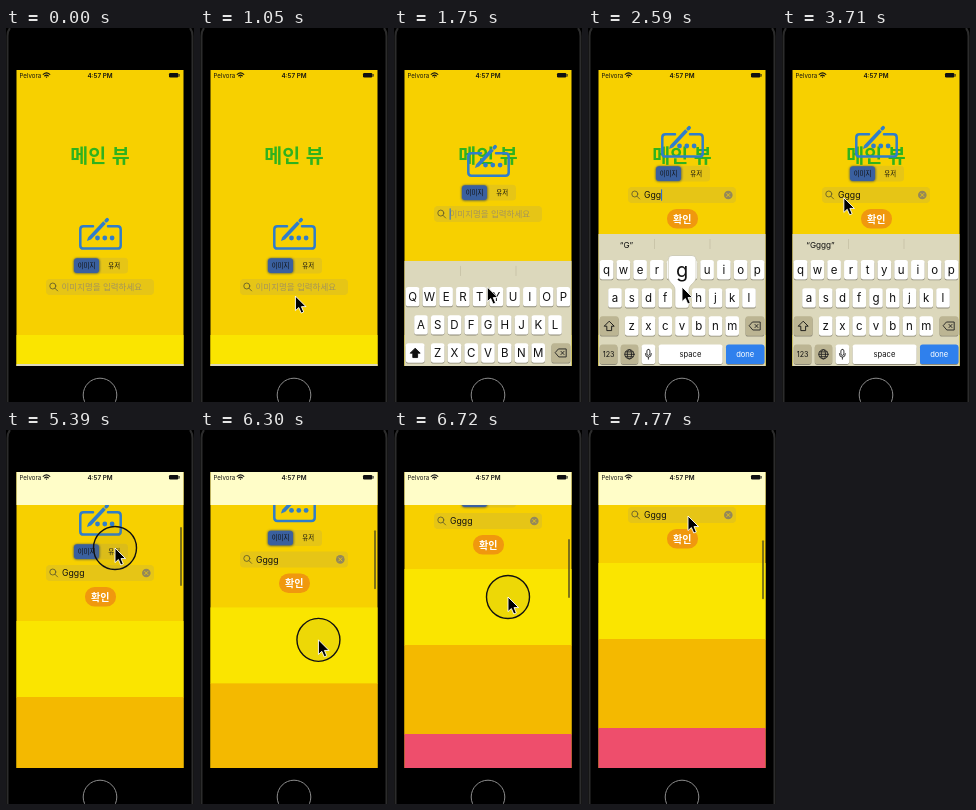
Write an HTML page that moves like this. It is 188 by 374 pixels and loops after 8 s.

```html
<!DOCTYPE html>
<html lang="ko">
<head>
<meta charset="utf-8">
<title>메인 뷰</title>
<style>
  html, body { margin: 0; width: 100%; height: 100%; overflow: hidden; background: #000; }
  svg { display: block; width: 100vw; height: 100vh; }
  text { font-family: Inter, "Noto Sans CJK KR", "Noto Sans CJK", sans-serif; text-anchor: middle; fill: #111; }
  .ko { font-family: "Noto Sans CJK KR", "Noto Sans CJK", sans-serif; }
  .left { text-anchor: start; }
  .key { fill: #fff; }
  .mod { fill: #bcb593; }
  .shade { fill: #8d8a78; }
  .line { fill: none; stroke: #222; stroke-width: .9; stroke-linecap: round; stroke-linejoin: round; }
  .icon { fill: none; stroke: #2f7dcb; stroke-width: 2.5; stroke-linecap: round; stroke-linejoin: round; }
</style>
</head>
<body>
<svg viewBox="0 0 188 374" preserveAspectRatio="none">
  <defs>
    <clipPath id="screen"><rect x="10.5" y="42" width="167" height="296"/></clipPath>
    <filter id="soft" x="-30%" y="-30%" width="160%" height="160%"><feGaussianBlur stdDeviation="1"/></filter>
  </defs>

  <rect width="188" height="374" fill="#000"/>
  <path d="M1.5 374V8Q1.5 3 4 0M186.5 374V8Q186.5 3 184 0" fill="none" stroke="#2c2c2c" stroke-width="2"/>
  <circle cx="94" cy="367" r="16.8" fill="none" stroke="#8c8c8c"/>

  <g clip-path="url(#screen)">
    <rect x="10" y="42" width="168" height="297" fill="#f7d000"/>

    <g id="page">
      <rect x="10" y="307" width="168" height="76.5" fill="#fae500"/>
      <rect x="10" y="383" width="168" height="89.5" fill="#f4b900"/>
      <rect x="10" y="472" width="168" height="120" fill="#ee4e6c"/>
      <text class="ko" x="94" y="135" font-size="19.5" font-weight="700" style="fill:#2fb21d">메인 뷰</text>

      <g id="form">
        <g class="icon">
          <path d="M87 198.2H77.5Q74.3 198.2 74.3 201.4V217.4Q74.3 220.6 77.5 220.6H111.5Q114.7 220.6 114.7 217.4V201.4Q114.7 198.2 111.5 198.2H102"/>
          <path d="M83.5 210.5L98.5 194.5" stroke-width="3.6" stroke-linecap="butt"/>
          <path d="M100.2 192.7L101.2 191.7" stroke-width="3.6"/>
        </g>
        <g fill="#2f7dcb">
          <path d="M81 213l1.2-4 2.6 2.5z"/>
          <circle cx="91.5" cy="210" r="2.4"/><circle cx="98.8" cy="210" r="2.4"/><circle cx="106.1" cy="210" r="2.4"/>
        </g>

        <rect x="67" y="229.7" width="55" height="15.8" rx="3.5" fill="#e6c516"/>
        <rect x="67.6" y="230.2" width="26" height="15.4" rx="3.5" fill="#56604a" filter="url(#soft)"/>
        <rect x="68" y="230.3" width="25" height="14.6" rx="3.2" fill="#3a609f"/>
        <text class="ko" x="80.5" y="239.9" font-size="6.4" font-weight="500">이미지</text>
        <text class="ko" x="108.2" y="239.9" font-size="6.4" font-weight="500">유저</text>

        <rect x="40" y="251" width="108" height="16" rx="4" fill="#e6c516"/>
        <circle cx="46.8" cy="258" r="3" class="line" style="stroke:#67602a"/>
        <path d="M49 260.3l2.6 2.6" class="line" style="stroke:#67602a"/>
        <text id="hint" class="ko left" x="55.5" y="262.2" font-size="8.5" style="fill:#a4955a">이미지명을 입력하세요</text>
        <text id="typed" class="left" x="56" y="262.2" font-size="8.7"></text>
        <rect id="caret" y="253.2" width="1.1" height="11.6" rx=".5" fill="#2f6fd6"/>

        <g id="filled">
          <circle cx="140.3" cy="259" r="4.3" fill="#94885a"/>
          <path d="M138.7 257.4l3.2 3.2m0-3.2l-3.2 3.2" class="line" style="stroke:#e6c516"/>
          <rect x="79" y="273" width="31" height="19.6" rx="9.6" fill="#f0980e"/>
          <text class="ko" x="94.3" y="286.5" font-size="10" font-weight="700" style="fill:#fff">확인</text>
        </g>
      </g>
    </g>

    <rect id="nav" x="10" y="42" width="168" height="33" fill="#fffdc8"/>
    <rect id="bar" x="174" y="97" width="2" height="59" rx="1" fill="#55501f" fill-opacity=".75"/>

    <text class="left" x="13.5" y="49.6" font-size="6.1">Pelvora</text>
    <g class="line" style="stroke:#111;stroke-width:1.1">
      <path d="M37.2 46.3q3.3-2.8 6.6 0M38.6 47.9q1.9-1.6 3.8 0"/>
    </g>
    <path d="M39.5 48.8q1-.8 2 0l-1 1.3z" fill="#111"/>
    <text x="94" y="49.7" font-size="6.3" font-weight="600">4:57 PM</text>
    <rect x="163" y="45" width="9.4" height="4.6" rx="1.3" fill="#111"/>
    <path d="M173.2 46.4v1.8" class="line"/>

    <g id="board">
      <rect x="10" y="206" width="168" height="134" fill="#dcd8bc"/>
      <path d="M66.5 211v10M122 211v10" stroke="#c6c1a5" stroke-width=".8"/>
      <text id="guess" x="38.5" y="220.2" font-size="8.2"></text>
      <g id="keys"></g>
      <path id="shift" d="M21.2 293.2l5 5h-2.6v4.4h-4.8v-4.4h-2.6z" stroke="#111" stroke-width=".9" stroke-linejoin="round"/>
      <path d="M164.8 294h7.4v8h-7.4l-3.4-4zM167 296.4l3 3.2m0-3.2l-3 3.2" class="line"/>
      <g class="line">
        <circle cx="41.4" cy="326.3" r="4.6"/><ellipse cx="41.4" cy="326.3" rx="2.1" ry="4.6"/>
        <path d="M36.8 326.3h9.2M37.6 323.9h7.6M37.6 328.7h7.6"/>
        <rect x="58.9" y="321.4" width="3" height="6" rx="1.5"/>
        <path d="M57.4 325.6q0 3.6 3 3.6t3-3.6M60.4 329.2v2"/>
      </g>
      <g id="popup">
        <path d="M84 227.5H104Q108 227.5 108 231.5V249C108 255 101 256 101 262V277Q101 280 98 280H90Q87 280 87 277V262C87 256 80.300 255 80.300 249V231.500Q80.300 227.500 84 227.500Z" fill="#fff" stroke="#bdb9a2" stroke-width=".6"/>
        <text id="big" x="94.2" y="249" font-size="20"></text>
      </g>
    </g>

    <g id="pointer">
      <circle id="ring" r="21.500" fill="#8a7a30" fill-opacity=".12" stroke="#111" stroke-width="1.400"/>
      <path d="M0 0V14.600L3.400 11.500L5.800 17L8.300 15.900L6 10.600H10.600Z" fill="#000" stroke="#fff" stroke-width=".9" stroke-linejoin="round"/>
    </g>
  </g>
</svg>

<script>
const LOOP = 8000;
const $ = id => document.getElementById(id);
const keys = $('keys');
const letters = [];

function add(name, attrs, text) {
  const el = document.createElementNS('http://www.w3.org/2000/svg', name);
  for (const k in attrs) el.setAttribute(k, attrs[k]);
  if (text) el.textContent = text;
  return keys.appendChild(el);
}

function addKey(x, y, w, cls) {
  add('rect', { x, y: y + .9, width: w, height: 19.4, rx: 2.6, class: 'shade' });
  return add('rect', { x, y, width: w, height: 19.4, rx: 2.6, class: cls });
}

[['QWERTYUIOP', 18.6, 232], ['ASDFGHJKL', 27, 260.2], ['ZXCVBNM', 43.7, 288.3]].forEach(([row, x0, y]) => {
  [...row].forEach((c, i) => {
    const x = x0 + i * 16.75;
    addKey(x - 6.8, y, 13.6, 'key');
    letters.push([add('text', { x, y: y + 13.8, 'font-size': 11.5 }), c]);
  });
});
const shiftKey = addKey(11.8, 288.3, 18.8, 'mod');
addKey(157.5, 288.3, 18.8, 'mod');
addKey(11.8, 316.6, 17.6, 'mod');
addKey(32.8, 316.6, 17.4, 'mod');
addKey(53.6, 316.6, 13.6, 'key');
addKey(70.6, 316.6, 64, 'key');
addKey(138, 316.6, 38.4, 'done').setAttribute('fill', '#2f80ed');
add('text', { x: 20.6, y: 329, 'font-size': 7.2 }, '123');
add('text', { x: 102.5, y: 329, 'font-size': 7.6 }, 'space');
add('text', { x: 157.2, y: 329, 'font-size': 7.6, style: 'fill:#fff' }, 'done');

// rows of [time, ...values], eased between rows
function track(rows, t) {
  let i = 0;
  while (i < rows.length - 1 && rows[i + 1][0] <= t) i++;
  const a = rows[i], b = rows[i + 1] || a;
  const u = Math.max(0, Math.min(1, (t - a[0]) / (b[0] - a[0] || 1)));
  const e = u * u * (3 - 2 * u);
  return a.slice(1).map((v, k) => v + (b[k + 1] - v) * e);
}

// critically damped spring from 0 to 1
function spring(ms) {
  const s = Math.max(0, ms) * .0183;
  return 1 - (1 + s) * Math.exp(-s);
}

const path = [
  [350, 182, 334], [840, 97, 274], [1330, 93, 259], [2500, 94, 259], [2750, 94, 259],
  [3220, 74, 152], [3450, 63, 150], [3920, 61, 184], [4410, 61, 184], [4690, 112, 236],
  [4970, 112, 236], [5390, 109, 118], [5530, 109, 118], [5950, 120, 225], [6090, 120, 225],
  [6720, 114, 167], [6930, 114, 167], [7210, 117, 165], [7350, 117, 165], [7770, 100, 86]
];
const scroll = [[4970, 0], [5390, 116], [6090, 116], [6720, 168], [6930, 168], [7210, 174]];
const taps = [[1970, 2070], [2170, 2270], [2370, 2470], [2540, 2680]];
const caretX = [55.6, 62.6, 67.8, 73, 78.2];

const move = (el, x, y) => el.setAttribute('transform', `translate(${x} ${y})`);
const show = (el, on) => el.setAttribute('opacity', +on);
const within = (t, a, b) => t >= a && t < b;
function write(el, s) { if (el.textContent !== s) el.textContent = s; }

function draw(t) {
  const [off] = track(scroll, t);
  const up = t < 4150 ? spring(t - 1590) : 1 - spring(t - 4150);
  move($('page'), 0, -off);
  move($('form'), 0, -92 * up);
  move($('board'), 0, (t < 4150 ? 130 : 145) * (1 - up));
  show($('nav'), Math.min(1, off / 10));
  show($('bar'), Math.min(1, off / 6));
  $('bar').setAttribute('y', 97 + (off - 116) * .23);

  const count = taps.filter(p => t >= p[1]).length;
  const caps = count === 0;
  write($('typed'), 'Gggg'.slice(0, count));
  show($('hint'), caps);
  show($('filled'), Math.max(0, Math.min(1, (t - taps[0][1]) / 140)));
  $('caret').setAttribute('x', caretX[count]);
  show($('caret'), within(t, 1640, 4150) && !within(t, 3220, 3750));

  write($('guess'), t < 2150 ? '' : t < 2870 ? '“G”' : '“Gggg”');
  letters.forEach(([el, c]) => write(el, caps ? c : c.toLowerCase()));
  shiftKey.setAttribute('class', caps ? 'key' : 'mod');
  $('shift').setAttribute('fill', caps ? '#111' : 'none');
  show($('popup'), taps.some(p => within(t, p[0], p[1])));
  write($('big'), caps ? 'G' : 'g');

  move($('pointer'), ...track(path, t));
  show($('pointer'), t > 350);
  show($('ring'), within(t, 5030, 5590) || within(t, 6150, 7410));
}

const start = performance.now();
function tick() {
  draw((performance.now() - start) % LOOP);
  requestAnimationFrame(tick);
}
tick();
</script>
</body>
</html>
```
